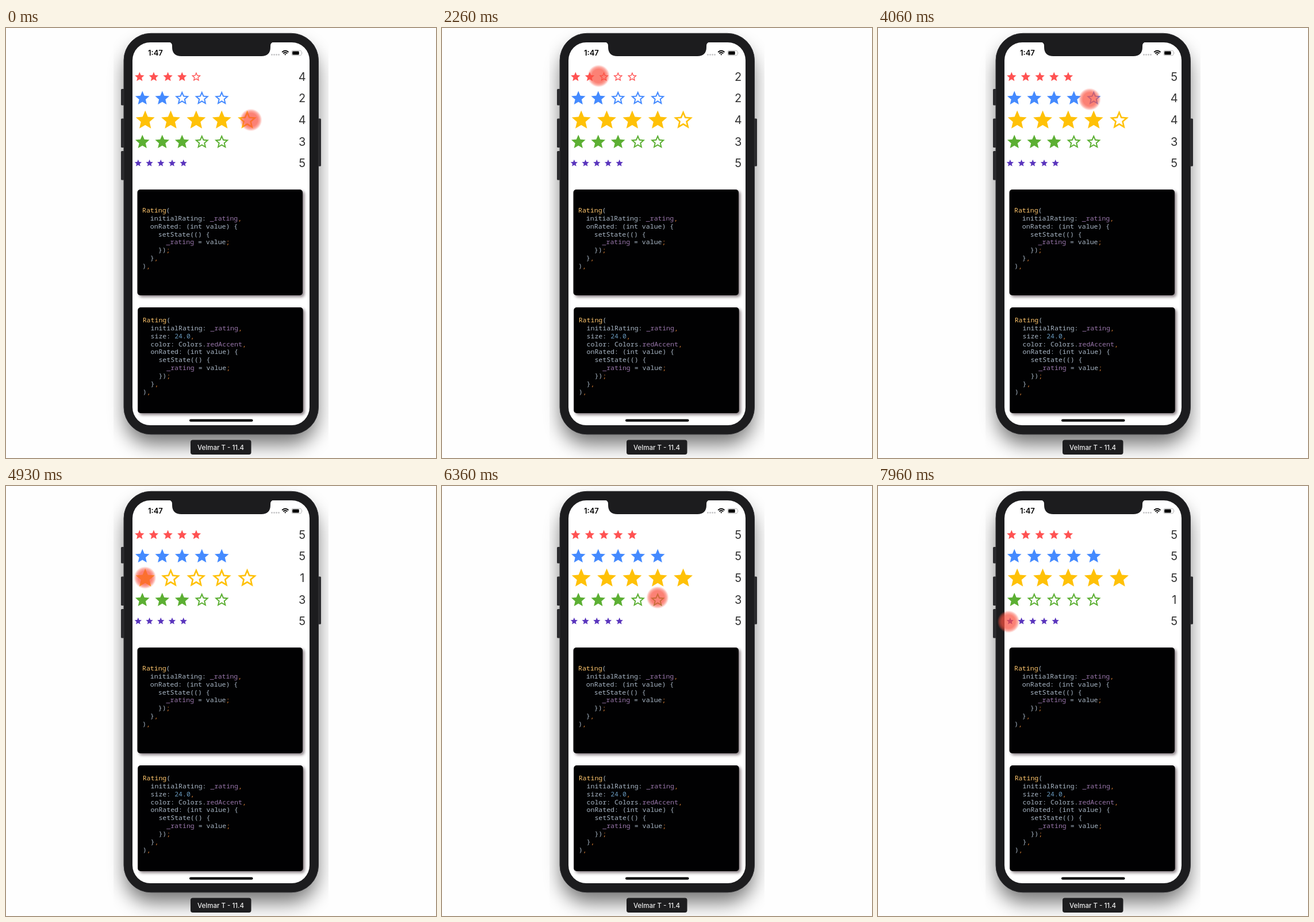
Write an HTML page that moves like this. It is 748x748 px and loops after 8 s.

```html
<!DOCTYPE html>
<html lang="en">
<head>
<meta charset="utf-8">
<title>Star rating demo</title>
<style>
  html, body { margin: 0; width: 100%; height: 100%; overflow: hidden; background: #fefefe; }
  svg { display: block; width: 100vw; height: 100vh; }
  text { font-family: Inter, "Liberation Sans", sans-serif; }
  .code text { font: 11.55px "Noto Sans Mono", "DejaVu Sans Mono", monospace; fill: #a9b7c6; white-space: pre; }
  .code .call { fill: #ffc66d; }
  .code .field { fill: #9876aa; }
  .code .number { fill: #6897bb; }
  .code .mark { fill: #cc7832; }
  .count { font-size: 20px; fill: #333; text-anchor: middle; }
</style>
</head>
<body>
<svg viewBox="0 0 748 748">
  <defs>
    <filter id="soft" x="-30%" y="-30%" width="160%" height="160%"><feGaussianBlur stdDeviation="17"/></filter>
    <filter id="cardSoft" x="-10%" y="-10%" width="120%" height="120%"><feGaussianBlur stdDeviation="2.5"/></filter>
    <clipPath id="inner"><rect x="187" width="374" height="748"/></clipPath>
    <clipPath id="outer"><rect x="160" width="27" height="748"/></clipPath>
    <radialGradient id="touchFill">
      <stop offset=".6" stop-color="#fa503f" stop-opacity=".72"/>
      <stop offset=".8" stop-color="#fa503f" stop-opacity=".48"/>
      <stop offset="1" stop-color="#fa503f" stop-opacity="0"/>
    </radialGradient>
  </defs>

  <!-- Device -->
  <g clip-path="url(#inner)"><rect x="207" y="32" width="334" height="692" rx="47" opacity=".55" filter="url(#soft)"/></g>
  <g clip-path="url(#outer)"><rect x="207" y="32" width="334" height="692" rx="47" opacity=".2" filter="url(#soft)"/></g>
  <g fill="#2a2a2d">
    <rect x="200" y="106" width="8" height="28.5" rx="1.5"/>
    <rect x="200" y="157.500" width="8" height="50.500" rx="1.5"/>
    <rect x="200" y="214" width="8" height="50.500" rx="1.5"/>
    <rect x="540" y="157.500" width="8" height="83" rx="1.5"/>
  </g>
  <rect x="205" y="9.300" width="338.500" height="697.500" rx="47" fill="#1c1c1e" stroke="#303033"/>
  <rect x="220" y="25" width="308" height="666" rx="31" fill="#fff"/>
  <path d="M283 24.500Q289 25 289 31V33Q289 49 305 49H444Q460 49 460 33V31Q460 25 466 24.500Z" fill="#1c1c1e"/>
  <rect x="319" y="680.500" width="110.500" height="4.300" rx="2.100"/>

  <!-- Status bar -->
  <text x="247" y="48" font-size="13" font-weight="600">1:47</text>
  <g fill="#c4c4c6">
    <circle cx="462.500" cy="46.500" r="1.400"/><circle cx="466.500" cy="46.500" r="1.400"/>
    <circle cx="470.500" cy="46.500" r="1.400"/><circle cx="474.500" cy="46.500" r="1.400"/>
  </g>
  <g fill="none" stroke="#000" stroke-width="1.900">
    <path d="M480.200 42Q485.800 36.800 491.400 42M482.300 44.300Q485.800 41 489.300 44.300"/>
    <path d="M484 45.700Q485.800 44.600 487.600 45.700L485.800 47.600Z" fill="#000" stroke="none"/>
  </g>
  <rect x="496.900" y="39.200" width="17" height="8.600" rx="2.400" fill="#fff" stroke="#aaa" stroke-width=".8"/>
  <rect x="498.200" y="40.500" width="11.500" height="6" rx="1.200"/>
  <path d="M515 42q1.300 1.500 0 3z" fill="#aaa"/>

  <g id="rows"></g>
  <g id="cards" class="code"></g>

  <rect x="321" y="716.500" width="105.500" height="25.500" rx="4" fill="#1d1d1f"/>
  <text x="373.500" y="734" font-size="11.500" font-weight="500" fill="#eee" text-anchor="middle">Velmar T - 11.4</text>
  <circle id="touch" r="19.500" fill="url(#touchFill)"/>
</svg>
<script>
const LOOP = 8000, LAG = 60, LEFT = 220, SCALE = 308 / 375;
const $ = id => document.getElementById(id);
const clamp = (v, lo, hi) => Math.min(hi, Math.max(lo, v));

function add(parent, tag, attrs = {}, text = '') {
  const node = document.createElementNS('http://www.w3.org/2000/svg', tag);
  for (const key in attrs) node.setAttribute(key, attrs[key]);
  node.textContent = text;
  return parent.appendChild(node);
}

// Stars are drawn in a 24-unit icon box.
const STAR = 'M12 17.27L18.18 21l-1.64-7.03L22 9.24l-7.19-.61L12 2 9.19 8.63 2 9.24l5.46 4.73L5.82 21z';
const HOLLOW = STAR + 'M12 15.4l-3.76 2.27 1-4.28-3.32-2.88 4.38-.38L12 6.1l1.71 4.04 4.38.38-3.32 2.88 1 4.28z';

// "from" and "to" limit the time in which the finger drags over a row.
const rows = [
  { y: 84.8, size: 24, color: '#ff5252', value: 4, from: 660, to: 2700 },
  { y: 121.9, size: 36, color: '#448aff', value: 2, from: 3170, to: 4300 },
  { y: 160, size: 48, color: '#ffc107', value: 4, from: 4490, to: 6120 },
  { y: 198, size: 36, color: '#5caf33', value: 3, from: 6420, to: 7430 },
  { y: 235, size: 18, color: '#5a35bd', value: 5, from: LOOP, to: LOOP },
];

for (const row of rows) {
  row.cell = (row.size + 6) * SCALE;
  const k = row.size * SCALE / 24;
  row.stars = [0, 1, 2, 3, 4].map(i => add($('rows'), 'path', {
    fill: row.color, 'fill-rule': 'evenodd',
    transform: `translate(${LEFT + (i + .5) * row.cell} ${row.y}) scale(${k}) translate(-12 -12)`,
  }));
  row.count = add($('rows'), 'text', { class: 'count', x: 515.2, y: row.y + 6.8 });
}

// Code cards
const handler = `  onRated: (int value) {
    setState(() {
      _rating = value;
    });
  },
),`;
const opening = 'Rating(\n  initialRating: _rating,\n';
const styles = [[/^Rating$/, 'call'], [/^(_rating|redAccent)$/, 'field'], [/^24/, 'number'], [/^[,;]$/, 'mark']];

function addCard(x, y, firstLine, code) {
  const box = { x, y, width: 287.5, height: 184, rx: 5 };
  add($('cards'), 'rect', { ...box, x: x + 3, y: y + 3, fill: '#3a2a33', opacity: .6, filter: 'url(#cardSoft)' });
  add($('cards'), 'rect', { ...box, fill: '#010102' });
  code.split('\n').forEach((line, i) => {
    const text = add($('cards'), 'text', { x: x + 8.5, y: firstLine + i * 13.86 });
    for (const part of line.split(/(^Rating|_rating|redAccent|24\.0|[,;])/)) {
      const style = styles.find(([pattern]) => pattern.test(part));
      if (part) add(text, 'tspan', style ? { class: style[1] } : {}, part);
    }
  });
}
addCard(228.5, 281, 321, opening + handler);
addCard(229.2, 486, 512, opening + '  size: 24.0,\n  color: Colors.redAccent,\n' + handler);

// Finger path: time, x, y
const path = [
  [0, 426, 160], [30, 424, 159], [460, 326, 87], [870, 326, 87], [1080, 302.5, 84.5],
  [1160, 310, 84], [1400, 310, 84], [1430, 312, 84], [2060, 265, 83.5], [2170, 265, 83.5],
  [2630, 338, 83.5], [2770, 338, 83.5], [3030, 372, 122], [3130, 372, 122], [3600, 258.5, 122],
  [3620, 258.5, 123], [4060, 368, 124], [4160, 392, 126], [4430, 430, 156], [4460, 429, 159],
  [4930, 242, 159.5], [5230, 213.5, 160.5], [5470, 213.5, 161], [6060, 436, 171], [6170, 436, 172],
  [6360, 375, 194], [6400, 375, 194], [6940, 256, 201], [7000, 239.5, 202], [7360, 212.5, 207],
  [7600, 212.5, 207], [7960, 227, 236], [LOOP, 227, 236],
];

const slope = (i, axis) => path[i] && path[i + 1]
  ? (path[i + 1][axis] - path[i][axis]) / (path[i + 1][0] - path[i][0]) : 0;

// Velocity at a point: zero at turns and rests, else the harmonic mean.
function velocity(i, axis) {
  const a = slope(i - 1, axis), b = slope(i, axis);
  return a * b > 0 ? 2 * a * b / (a + b) : 0;
}

function finger(t, axis) {
  const i = Math.max(0, path.findIndex(p => p[0] > t) - 1);
  const p = path[i], q = path[i + 1], span = q[0] - p[0], u = (t - p[0]) / span, w = 1 - u;
  return p[axis] * w * w * (1 + 2 * u) + q[axis] * u * u * (1 + 2 * w)
    + span * u * w * (w * velocity(i, axis) - u * velocity(i + 1, axis));
}

function rating(row, t) {
  if (t < row.from) return row.value;
  const x = finger(Math.min(t, row.to) - LAG, 1);
  return clamp(Math.ceil((x - LEFT) / row.cell), 1, 5);
}

function draw(t) {
  for (const row of rows) {
    const value = rating(row, t);
    if (value === row.shown) continue;
    row.shown = value;
    row.stars.forEach((star, i) => star.setAttribute('d', i < value ? STAR : HOLLOW));
    row.count.textContent = value;
  }
  $('touch').setAttribute('cx', finger(t, 1));
  $('touch').setAttribute('cy', finger(t, 2));
}

const start = performance.now();
function tick() {
  draw((performance.now() - start) % LOOP);
  requestAnimationFrame(tick);
}
tick();
</script>
</body>
</html>
```
